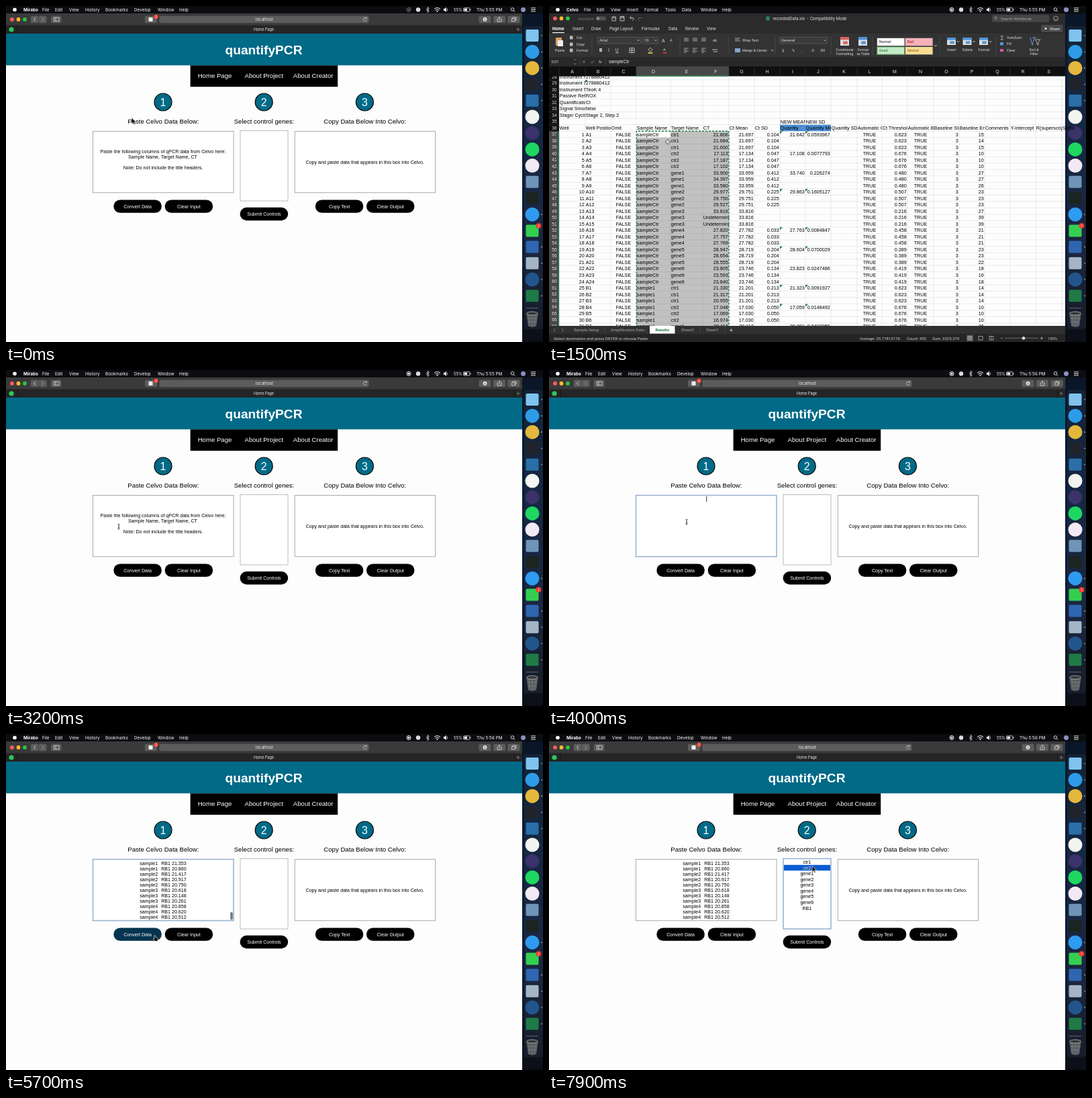
Recreate the animation shown at these times as an HTML page. Size 800 by 500 pixels, loop 8 s.

```html
<!DOCTYPE html>
<html lang="en">
<head>
<meta charset="utf-8">
<title>quantifyPCR demo</title>
<style>
html, body { margin: 0; width: 100%; height: 100%; overflow: hidden; background: #0a101c; }
#stage { display: block; width: 800px; height: 500px; }
text { font-family: "Liberation Sans", Arial, sans-serif; white-space: pre; }
.menu { font-family: Inter, sans-serif; }
.ui { font-family: Roboto, sans-serif; }
#cursor { animation: move 8s infinite; }
@keyframes move {
  0%, 16% { transform: translate(187px, 168px); }
  25%, 41% { transform: translate(168px, 233px); }
  46.2%, 57% { transform: translate(205px, 226px); }
  68%, 77% { transform: translate(222px, 303px); }
  91%, 100% { transform: translate(392px, 198px); }
}
#ants { animation: march .6s linear infinite; }
@keyframes march { to { stroke-dashoffset: -5; } }
#gallery { animation: wake 8s infinite; }
@keyframes wake { 0%, 7.5% { opacity: .55; } 10%, 100% { opacity: 1; } }
#leave { animation: fadeA 8s infinite; }
@keyframes fadeA { 0%, 2.4% { opacity: 0; } 2.5%, 6.2% { opacity: .95; } 7.5% { opacity: .38; } 9%, 100% { opacity: 0; } }
#back { animation: fadeB 8s infinite; }
@keyframes fadeB { 0%, 31.2% { opacity: 0; } 31.3%, 36.2% { opacity: .95; } 39%, 100% { opacity: 0; } }
#convert { animation: hover 8s infinite; }
@keyframes hover { 0%, 67% { fill: #000; } 70%, 76% { fill: #04344f; } 79%, 100% { fill: #000; } }
</style>
</head>
<body>
<svg id="stage" viewBox="0 0 800 500"></svg>
<script>
const LOOP = 8000;
const TEAL = '#006a87';
const css = [];

// y is the optical middle of the line
const T = (s, x, y, size, fill = '#000', at = 'start', cls = '', bold = 400) =>
  `<text x="${x}" y="${(y + size * .36).toFixed(2)}" font-size="${size}" fill="${fill}" text-anchor="${at}" class="${cls}" font-weight="${bold}">${s}</text>`;
const R = (x, y, w, h, fill, more = '') =>
  `<rect x="${x}" y="${y}" width="${w}" height="${h}" fill="${fill}" ${more}/>`;
const C = (x, y, r, fill, more = '') => `<circle cx="${x}" cy="${y}" r="${r}" fill="${fill}" ${more}/>`;
const P = (d, stroke = '#ddd', w = .8, fill = 'none') =>
  `<path d="${d}" stroke="${stroke}" stroke-width="${w}" fill="${fill}"/>`;
const mid = (s, x, y, size, fill, cls, bold) => T(s, x, y, size, fill, 'middle', cls, bold);
const ui = (s, x, y, size = 5.2, fill = '#ddd', at, bold) => T(s, x, y, size, fill, at, 'ui', bold);
const each = (list, fn) => list.map(fn).join('');

// shows the body only during the given [from, to] spans in ms
function during(body, ...spans) {
  const name = 'show' + css.length;
  const steps = each(spans, ([a, b]) =>
    `${a / LOOP * 100}%{opacity:1}` + (b < LOOP ? `${b / LOOP * 100}%{opacity:0}` : ''));
  css.push(`@keyframes ${name}{0%{opacity:0}${steps}}`);
  return `<g style="animation:${name} 8s step-end infinite">${body}</g>`;
}

const lights = y => each(['#ff5f57', '#febc2e', '#28c840'], (c, i) => C(9 + i * 9.5, y, 2.9, c));

function menuItems(app, pairs) {
  return T(app, 26, 5.5, 6.4, '#fff', 'start', 'menu', 700) +
    each(pairs, ([s, x]) => T(s, x, 5.5, 6.4, '#fff', 'start', 'menu'));
}

function statusIcons() {
  const clock = s => T(s, 701, 5.5, 6.4, '#fff', 'start', 'menu');
  return C(13, 5.5, 2.8, '#fff') +
    during(C(600, 5.5, 3, 'none', 'stroke="#777"') + C(600, 5.5, 1.2, '#777'), [0, 500]) +
    during(C(600, 5.5, 3, 'none', 'stroke="#fff"') + C(600, 5.5, 1.6, '#fff'), [500, LOOP]) +
    C(614, 5.5, 3.2, '#ddd') +
    P('M626 3.5L630.5 7.5L628.3 9.5V1.5L630.5 3.5L626 7.5', '#fff', .7) +
    P('M638 4.5Q642.5 .8 647 4.5M639.6 6.3Q642.5 4 645.4 6.3', '#fff', 1) + C(642.5, 8, 1, '#fff') +
    P('M652 4.2h1.5l2.2-2v6.6l-2.2-2h-1.5z', '#fff', .3, '#fff') + P('M657 3.6q1.4 2 0 4', '#fff', .7) +
    T('55%', 667, 5.5, 5.9, '#fff', 'start', 'menu') +
    R(681.5, 2.8, 9.5, 5.4, 'none', 'rx="1" stroke="#fff" stroke-width=".7"') + R(682.5, 3.8, 4.5, 3.4, '#fff') + R(691.4, 4.5, 1, 2, '#fff') +
    during(clock('Thu 5:55 PM'), [0, 3700]) + during(clock('Thu 5:56 PM'), [3700, LOOP]) +
    C(754.5, 5, 2.3, 'none', 'stroke="#fff" stroke-width=".8"') + P('M756.2 6.8l2 2', '#fff') +
    C(770.5, 5.5, 3.5, '#8d8fc4') + P('M782 3h7M782 5.5h7M782 8h7', '#fff', .9);
}

function dock() {
  // colour, round?, running?
  const apps = [['#7fc4ee', 0, 1], ['#2d9be8', 1, 1], ['#e3b83c', 1, 1], ['#20242a', 0, 1], ['#2a6fa8', 0, 1], ['#f4f4f0', 1], ['#3a3268', 1],
    ['#1ed760', 1], ['#f3e9f3', 1], ['#6f94b8', 0], ['#1c2422', 0], ['#2f9bf0', 1, 1], ['#35cf50', 0], ['#2f66b0', 0, 1],
    ['#a4b6c6', 0, 1], ['#22558c', 1, 1], ['#1f7a46', 0, 1]];
  return R(769, 0, 31, 500, 'url(#sky)') + R(772, 30, 28, 451, '#8da0c0', 'opacity=".08" rx="3"') +
    each(apps, ([c, round, on], i) => {
      const y = 44 + i * 24.2;
      return (round ? C(784, y, 10.5, c) : R(774.5, y - 9, 19, 18, c, 'rx="2"')) + (on ? C(798, y, .8, '#cdd') : '');
    }) +
    C(793.5, 327, 4, '#f4342e') + mid('1', 793.5, 327, 5.5, '#fff') +
    P('M775 449.5h18', '#8590a5', .6) +
    P('M776 458L778.5 476Q784 478.5 789.5 476L792 458z', '#888', .6, '#55595c') +
    P('M779 460l2 15M784 460v16M789 460l-2 15M777 465h14M778 470h12', '#92979a', .5) +
    `<ellipse cx="784" cy="457.5" rx="8.5" ry="2.6" fill="#34383a" stroke="#aaa" stroke-width=".9"/>`;
}

function browserBar() {
  const btn = (x, w) => R(x, 14.8, w, 10.4, '#5c5c5c', 'rx="1.8"');
  return R(0, 11, 769, 18, '#3a3a3b') + R(0, 28.6, 769, 12.4, '#252526') + lights(20) +
    btn(37, 11.5) + btn(49, 11.5) + btn(67, 15.5) + btn(704.5, 18) + btn(726, 18) + btn(747.5, 18) +
    P('M44 17.3L41.6 20L44 22.7', '#eee') + P('M53.6 17.3L56 20L53.6 22.7', '#aaa') +
    P('M71.5 17.3h7.5v5.4h-7.5zM74 17.3v5.4', '#eee', .7) +
    btn(207, 18) + R(212.5, 17, 6, 6, '#eee') + C(223.5, 16, 3.3, '#f23d36') + mid('2', 223.5, 16, 4.5, '#fff') +
    R(228.5, 14.8, 312, 10.4, '#5c5c5c', 'rx="1.8"') + mid('localhost', 385, 20, 6.1, '#f0f0f0', 'menu') +
    P('M536.8 18.2A2.5 2.5 0 1 0 537.3 20.6M537.2 16.6v2h-2', '#ddd', .7) +
    C(713.5, 20, 2.9, '#eee') + P('M713.5 18v3.6M712 20.2l1.5 1.6l1.5-1.6', '#444', .6) +
    P('M733 19h-1v4.2h6V19h-1M735 21.5v-5M733.5 18l1.5-1.6l1.5 1.6', '#eee', .7) +
    P('M753.5 18.8h5v4h-5zM755 18.6v-1.6h5v4h-1.4', '#eee', .7) +
    C(8, 35, 3.6, '#2fc65a') + P('M17.2 29v12M757.5 29v12', '#111', .7) + mid('Home Page', 384, 35, 5.5, '#eee', 'menu') +
    P('M760.5 35h5M763 32.5v5', '#999', .7);
}

function page() {
  const box = (x, y, w, h, stroke = '#aaa', lw = 1) => R(x, y, w, h, '#fff', `stroke="${stroke}" stroke-width="${lw}"`);
  const focus = (x, y, w, h) => R(x, y, w, h, 'none', 'stroke="#b9cfe8" stroke-width="1.9"') + R(x, y, w, h, 'none', 'stroke="#8da3bf" stroke-width=".6"');
  const pill = (s, x, y, id = '') => R(x, y, 71.6, 19.4, '#000', `rx="9.7" ${id}`) + mid(s, x + 35.8, y + 9.8, 7.1, '#fff');
  const steps = ['Paste Celvo Data Below:', 'Select control genes:', 'Copy Data Below Into Celvo:'];
  const pasted = [[1, 21.353], [1, 20.86], [2, 21.417], [2, 20.917], [2, 20.75], [3, 20.618], [3, 20.148], [3, 20.261], [4, 20.858], [4, 20.62], [4, 20.512]];
  const genes = ['ctr1', 'ctr2', 'gene1', 'gene2', 'gene3', 'gene4', 'gene5', 'gene6', 'RB1'];
  const rows = each(pasted, ([n, v], i) => {
    const y = 192 + i * 8.06;
    return T('sample' + n, 199.3, y, 7.1) + T('RB1 ' + v.toFixed(3), 231.2, y, 7.1);
  });
  return R(0, 41, 769, 459, '#fdfdfd') + R(0, 41, 769, 47.3, TEAL) +
    mid('quantifyPCR', 384, 65, 19.2, '#fff', '', 700) +
    R(274.6, 88.3, 219.6, 31.9, '#000') +
    each([['Home Page', 311], ['About Project', 384.3], ['About Creator', 457.7]], ([s, x]) => mid(s, x, 104, 9.6, '#fff')) +
    each(steps, (s, i) => C(234 + 150.2 * i, 143, 13, TEAL, 'stroke="#000" stroke-width="1.2"') +
      mid(i + 1, 234 + 150.2 * i, 143, 16, '#fff') + mid(s, 234.3 + 150.2 * i, 171.2, 9.6)) +
    box(129.5, 186.5, 209.5, 91.2) + box(349, 185.5, 71, 104.5, '#bbb') + box(430.3, 186.5, 209.2, 91.2) +
    during(mid('Paste the following columns of qPCR data from Celvo here:', 234, 216, 7.1) +
      mid('Sample Name, Target Name, CT', 233.5, 224.2, 7.1) +
      mid('Note: Do not include the title headers.', 234, 240.4, 7.1), [0, 3600]) +
    mid('Copy and paste data that appears in this box into Celvo.', 534.7, 232.3, 7.1) +
    during(focus(129.5, 186.5, 209.5, 91.2), [3600, 6000]) +
    during(R(234.4, 188, .8, 8, '#000'), [3600, 4150]) +
    during(rows, [4500, LOOP]) +
    during(R(334.2, 265, 3.6, 11.5, '#777', 'rx="1.8"'), [4500, 6000]) +
    during(R(349.5, 194.8, 70, 8.5, '#0a5cd2') + focus(349, 185.5, 71, 104.5), [7500, LOOP]) +
    during(each(genes, (s, i) => mid(s, 384.3, 190.5 + i * 8.57, 7.1)), [6100, LOOP]) +
    during(mid('ctr2', 384.3, 199.07, 7.1, '#fff'), [7500, LOOP]) +
    pill('Convert Data', 160.3, 288.4, 'id="convert"') + pill('Clear Input', 236.6, 288.4) + pill('Submit Controls', 348.6, 299.8) +
    pill('Copy Text', 460.8, 288.4) + pill('Clear Output', 536.9, 288.4);
}

const EDGES = [15, 54, 92, 130, 181, 229, 268, 306, 344, 382, 420, 459, 496, 534, 573, 611, 649, 687, 725, 764, 802];
const rowY = r => 191 + 9.52 * (r - 37);

function ribbon() {
  const lines = (x, y, ws) => P(each(ws, (w, i) => `M${x} ${y + i * 2}h${w}`), '#ccc', .7);
  const field = (x, w) => R(x, 46.5, w, 9.5, '#3a3a3a', 'rx="1" stroke="#666" stroke-width=".6"') + P(`M${x + w - 6} 50l2 2l2-2`, '#ccc', .7);
  const grid = (x, y, w, h, c) => R(x, y, w, h, '#ddd') + R(x, y, w, h / 3, c) + R(x + w / 3, y + h / 2, w / 2, h / 3, c);
  const tabs = [['Insert', 35], ['Draw', 63], ['Page Layout', 90], ['Formulas', 138], ['Data', 178], ['Review', 203], ['View', 235]];
  const styles = [['Normal', 489, 48, '#fff', '#111'], ['Bad', 531, 48, '#f7b2b8', '#a01020'], ['Good', 489, 61, '#c3ebc6', '#14691c'], ['Neutral', 531, 61, '#f8dc93', '#8d5c00']];
  return R(0, 11, 769, 30, '#2b2b2c') + R(0, 41, 769, 35, '#333334') + lights(18.5) +
    ui('AutoSave', 43, 18.5, 5.6, '#777') + R(70, 15.5, 15, 6, '#505050', 'rx="3"') + C(73, 18.5, 2.4, '#888') +
    P('M94 16h5.5v6H94zM96 16v2h3', '#ddd') + P('M106 15.5h6v6.5h-6zM107.5 15.5v2.5h3v-2.5', '#ddd') +
    P('M121 17.5h4.5q2 2.2-1.5 4.4M122.5 15.5l-2 2l2 2', '#ddd') + P('M138 17.5h-4.5q-2 2.2 1.5 4.4', '#777') +
    R(323.5, 15.5, 5, 6, '#2d8a54') + mid('recordedData.xls&#160; - &#160;Compatibility Mode', 388.5, 18.6, 6.3, '#ddd', 'ui') +
    R(660, 13.3, 85, 10.6, '#454546', 'rx="2"') + C(665.5, 18, 1.8, 'none', 'stroke="#bbb" stroke-width=".6"') + ui('Search Workbook', 673, 18.6, 5.9, '#aaa') +
    C(755, 18.5, 3.4, 'none', 'stroke="#ccc" stroke-width=".7"') + P('M753.4 19.4q1.6 1.6 3.2 0', '#ccc', .6) +
    ui('Home', 5, 33.5, 6.5, '#fff', 'start', 700) + R(5, 39, 18, 1.2, '#fff') +
    each(tabs, ([s, x]) => ui(s, x, 33.5, 6.4)) +
    R(733, 28, 32.5, 11, '#48484a', 'rx="1.5"') + C(740, 33.5, 1.5, '#eee') + ui('Share', 746, 33.6, 5.8, '#fff') +
    R(10, 47, 9, 12, '#d6a55a', 'rx="1"') + R(13, 51, 8, 9, '#eee') + ui('Paste', 9, 66, 5.6) +
    each([['Cut', 47], ['Copy', 57], ['Format', 66]], ([s, y]) => R(31, y - 2.5, 4.5, 5, '#bcbcbc') + ui(s, 41, y, 5.4)) +
    P(each([64, 195, 268, 337, 420, 482, 582, 666], x => `M${x} 45v27`), '#505050', .7) +
    field(72, 65) + ui('Arial', 75, 51.3, 6) + field(139, 24) + ui('10', 142, 51.3, 6) +
    ui('A', 168, 51, 7) + ui('A', 180, 51, 5.6) +
    ui('B', 75, 66, 6.6, '#fff', 'start', 700) + `<g font-style="italic">${ui('I', 88, 66, 6.6)}</g>` + ui('U', 99, 66, 6.6) + P('M99 69.5h5M120 62.5h7v7h-7zM123.5 62.5v7M120 66h7') +
    P('M148 65l3-3l3 3l-3 3z', '#ddd') + R(147.5, 69, 7, 1.6, '#f2dc3c') + ui('A', 170, 65.3, 6) + R(169.5, 69, 6, 1.6, '#e33') +
    each([201, 214, 227], x => lines(x, 48, [7, 7, 7]) + lines(x, 63, [7, 4, 7, 4])) + ui('ab', 244, 50.5, 5.6) + P('M243 65h8M245 68h6') +
    lines(277, 48, [8, 6, 8]) + ui('Wrap Text', 288, 50.8, 5.4) + R(277, 63, 8, 6, '#7fa9cf') + ui('Merge &amp; Center', 288, 66, 5.4) + P('M331 65l1.7 2l1.7-2') +
    field(343, 72) + ui('General', 346, 51.3, 6) + each([['$', 347], ['%', 362], [',', 376], ['.0', 390], ['.00', 403]], ([s, x]) => ui(s, x, 66, 6)) +
    grid(434, 46, 13, 13, '#d5665f') + mid('Conditional', 440.5, 65, 5.2, '#ddd', 'ui') + mid('Formatting', 440.5, 71, 5.2, '#ddd', 'ui') +
    grid(461, 46, 13, 13, '#4f94d8') + mid('Format', 468, 65, 5.2, '#ddd', 'ui') + mid('as Table', 468, 71, 5.2, '#ddd', 'ui') +
    `<g id="gallery">` + R(488, 47, 84, 26, '#555') +
    each(styles, ([s, x, y, bg, fg]) => R(x, y, 40.5, 11, bg, s === 'Good' ? 'stroke="#61a868" stroke-width=".9"' : '') + ui(s, x + 3, y + 5.5, 5.2, fg)) + `</g>` +
    P('M574 58l2 2l2-2') +
    each([['Insert', 600], ['Delete', 623.5], ['Format', 648]], ([s, x]) => grid(x - 7, 47, 13, 11, '#4f94d8') + mid(s, x, 65, 5.3, '#ddd', 'ui') + P(`M${x + 8} 52l1.6 2l1.6-2`)) +
    P('M677 45h-4l2.5 2.5L673 50h4', '#ddd', .7) + ui('AutoSum', 682, 47.3, 5.4) + R(672, 54, 5, 4.5, '#4f94d8') + ui('Fill', 682, 56.5, 5.4) + R(672, 64, 5, 4, '#d5a') + ui('Clear', 682, 66, 5.4) +
    P('M717 47l3 11l3-11M726 47h-6', '#7db2e8') + P('M724 50h8l-3 4v4l-2-1v-3z', '#ddd', .7) + mid('Sort &amp;', 722.5, 65, 5.2, '#ddd', 'ui') + mid('Filter', 722.5, 71, 5.2, '#ddd', 'ui') +
    R(0, 76, 769, 14, '#292929') + ui('D37', 4, 83, 5.8) + P('M37 81l1.8-2l1.8 2M37 85l1.8 2l1.8-2M50 81l4 4M54 81l-4 4M62 83l2 2l3-4', '#999', .7) +
    `<g font-style="italic">${ui('fx', 74, 83, 6)}</g>` + P('M46 78v10M84 78v10', '#555', .6) + T('sampleCtr', 89, 83, 6.7, '#eee');
}

function sheet() {
  const ct = [21.806, 21.684, 21.6, 17.113, 17.1874, 17.1016, 33.9, 34.397, 33.58, 29.977, 29.75, 29.527, 33.816, null, null, 27.82, 27.757, 27.769,
    28.947, 28.654, 28.555, 23.805, 23.593, 23.84, 21.33, 21.317, 20.955, 17.048, 17.069, 16.974, 30.112];
  const target = 'ctr1 ctr2 gene1 gene2 gene3 gene4 gene5 gene6'.split(' ');
  const limit = ['0.623', '0.676', '0.480', '0.507', '0.216', '0.458', '0.389', '0.419'];
  const end = [15, 14, 15, 10, 10, 10, 27, 27, 26, 23, 23, 23, 27, 39, 39, 21, 21, 21, 23, 23, 22, 18, 16, 18, 14, 14, 14, 10, 10, 10, 26];
  const fresh = ['21.642 0.0593967', '17.108 0.0077793', '33.740 0.226274', '29.863 0.1605127', '', '27.763 0.0084847', '28.604 0.0700029', '23.823 0.0247486', '21.323 0.0091927', '17.059 0.0148492', '29.081 0.0402059'];
  const flagged = [0, 3, 5, 6, 8, 9];
  const heads = ['Well', 'Well Position', 'Omit', 'Sample Name', 'Target Name', 'CT', 'Ct Mean', 'Ct SD', 'Quantity', 'Quantity Mean', 'Quantity SD', 'Automatic Ct', 'Ct Threshold', 'Automatic Ba', 'Baseline Start', 'Baseline End', 'Comments', 'Y-Intercept', 'R(superscript)', 'Slope'];
  const info = [['Instrument Name', '278880412'], ['Instrument Serial', '278880412'], ['Instrument Type', 'TeoK 4'], ['Passive Reference', 'ROX'], ['Quantification', 'Ct'], ['Signal Smoothing', 'false'], ['Stage/ Cycling', '']];
  const cell = (s, col, row, at = 'start') => {
    const x = EDGES[col], w = EDGES[col + 1] - x;
    const tx = at === 'start' ? .8 : at === 'end' ? w - 1.2 : w / 2;
    return `<svg x="${x}" y="${rowY(row) - 5}" width="${w}" height="10">${T(s, tx, 5, 7.2, '#000', at)}</svg>`;
  };
  const flag = (x, row) => P(`M${x} ${rowY(row) - 4.5}h4l-4 4z`, 'none', 0, '#1e7a3c');
  const top = rowY(36.5);
  let out = R(15, 104, 754, 372, '#fdfdfd') + R(130, top, 138, 300, '#c1c1c1') + R(130, top, 51, 9.5, '#fff') + R(344, rowY(35.5), 76, 9.5, '#4b8fd6');
  out += P(each(EDGES, x => `M${x} 104V476`) + each([...Array(40).keys()], i => `M15 ${(rowY(28.5) + i * 9.52).toFixed(2)}H769`), 'rgba(110,110,110,.22)', .6);
  out += each(info, ([a, b], i) => cell(a, 0, 28 + i) + cell(b, 1, 28 + i)) + T('Stage 2, Step 2', 54.8, rowY(34), 7.2) + flag(54, 29);
  out += cell('NEW MEAN', 8, 35) + cell('NEW SD', 9, 35) + each(heads, (s, i) => cell(s, i, 36));
  ct.forEach((v, i) => {
    const r = 37 + i, k = Math.floor(i / 3), set = ct.slice(k * 3, k * 3 + 3).filter(n => n);
    const mean = set.reduce((a, b) => a + b) / set.length;
    const sd = Math.sqrt(set.reduce((a, b) => a + (b - mean) ** 2, 0) / (set.length - 1));
    out += cell(i + 1, 0, r, 'end') + cell('AB'[i < 24 ? 0 : 1] + (i % 24 + 1), 1, r) + cell('FALSE', 2, r, 'middle') +
      cell(i < 24 ? 'sampleCtr' : 'sample1', 3, r) + cell(target[k % 8], 4, r) +
      (v ? cell(v.toFixed(3), 5, r, 'end') : cell('Undetermined', 5, r)) + cell(mean.toFixed(3), 6, r, 'end') +
      (set.length > 1 ? cell(sd.toFixed(3), 7, r, 'end') : '') +
      cell('TRUE', 11, r, 'middle') + cell(limit[k % 8], 12, r, 'end') + cell('TRUE', 13, r, 'middle') + cell(3, 14, r, 'end') + cell(end[i], 15, r, 'end');
    if (i % 3 === 0 && fresh[k]) {
      const [m, s] = fresh[k].split(' ');
      out += cell(m, 8, r, 'end') + cell(s, 9, r, 'end') + (flagged.includes(k) ? flag(344, r) + flag(382, r) : '');
    }
  });
  out += `<path id="ants" d="M130.3 476V${top}H268V476" fill="none" stroke="#1c8045" stroke-width="1.3" stroke-dasharray="3 2"/>`;
  out += R(0, 104, 15, 372, '#0f0f10') + R(0, top, 15, 290, '#484848') + R(14.2, top, 1, 290, '#2b9457');
  for (let r = 28; r < 68; r++) out += mid(r, 8, rowY(r), 6.6, '#e4e4e4') + P(`M0 ${rowY(r + .5)}h15`, '#555', .4);
  out += R(0, 90, 769, 14.5, '#0f0f10') + R(130, 90, 138, 14.5, '#484848') + R(130, 103.4, 138, 1.1, '#2b9457') +
    each([...'ABCDEFGHIJKLMNOPQRS'], (c, i) => mid(c, (EDGES[i] + EDGES[i + 1]) / 2, 97.5, 7, '#e4e4e4') + P(`M${EDGES[i]} 91v12`, '#444', .5));
  return out;
}

function sheetTabs() {
  const tabs = [['Sample Setup', 37], ['Amplification Data', 92], ['Sheet2', 197], ['Sheet1', 234]];
  return R(0, 476, 769, 12, '#303031') + R(0, 488, 769, 12, '#252526') +
    P('M9.5 480l-2.5 2.5l2.5 2.5M19 480l2.5 2.5l-2.5 2.5', '#999') + R(150, 476, 37.5, 11.5, '#fff') + mid('Results', 168.8, 482, 6.1, '#1c7a43', 'ui', 700) +
    each(tabs, ([s, x]) => ui(s, x, 482, 6.1, '#aaa')) + P('M269 482.5h5M271.5 480v5', '#ccc') +
    P('M83 477v10M145 477v10M225 477v10M262 477v10', '#555', .5) +
    each([['Select destination and press ENTER or choose Paste', 7], ['Average: 25.77813178', 463], ['Count: 405', 533], ['Sum: 3325.379', 571], ['150%', 743]], ([s, x]) => ui(s, x, 494.4, 6, '#d0d0d0')) +
    R(622, 489.5, 10, 9.5, '#505050') + P('M624 491.5h6v5.5h-6zM624 494h6M627 491.5v5.5M640 491.5h6v5.5h-6zM656 491.5h6v5.5h-6zM659 491.5v5.5', '#ddd', .6) +
    P('M673 494.3h3M732 494.3h4M734 492.3v4', '#ccc', .7) + P('M679 494.3h50', '#777', .9) + C(707, 494.3, 2.4, '#ddd');
}

function switcher(id, span, picked, label, first) {
  const rest = ['#4794d4', '#9cc9ea', '#3a3d40', '#c4ccd2', '#54aaf0', '#3f74bc', '#e6bd4a'];
  const round = ['#3aa5ec', '#2d5f94', '#54aaf0', '#e6bd4a'];
  return `<g id="${id}">` + during(R(78, 212, 642, 86, '#777', 'rx="9" opacity=".14"'), span) +
    each([...first, ...rest], (c, i) => {
      const x = 113 + i * 63.5;
      return round.includes(c) ? C(x, 249, 23.5, c) : R(x - 24, 226, 49, 46, c, 'rx="5"');
    }) + mid(label, 113 + picked * 63.5 + 5, 289, 7.5, '#888', 'menu') + `</g>`;
}

function pointer() {
  const arrow = P('M0-2v9.5l2.2-2l1.5 3.3l1.5-.7l-1.5-3.1h3z', '#fff', .6, '#111');
  const hand = dark => P('M-1.3-3q1.1-1.2 1.6 0l.5 2.6l2.8.7q1.1.5.9 2l-.8 2.9H-.4L-2.8 2q.3-1.3 1.6-.3z', dark ? '#fff' : '#222', .6, dark ? '#111' : '#fff');
  const cross = P('M-1-3.4h2v2.4h2.4v2H1v2.4h-2V1h-2.4v-2H-1z', '#222', .6, '#fff');
  const beam = P('M-1.6-3.5Q0-3.5 0-2.4V2.6Q0 3.7-1.6 3.7M1.6-3.5Q0-3.5 0-2.4M0 2.6Q0 3.7 1.6 3.7M-1 1h2', '#111', .8);
  return `<g id="cursor">` + during(arrow, [0, 500], [5000, 5350], [6300, LOOP]) + during(hand(false), [500, 1300]) + during(hand(true), [5350, 6300]) +
    during(cross, [1300, 2900]) + during(beam, [2900, 5000]) + `</g>`;
}

const MENU_TAIL = [['Window', 226], ['Help', 258]];
const browserMenu = menuItems('Mirabo', [['File', 54], ['Edit', 73], ['View', 94], ['History', 118], ['Bookmarks', 148], ['Develop', 191], ...MENU_TAIL]);
const gridMenu = menuItems('Celvo', [['File', 52], ['Edit', 71], ['View', 92], ['Insert', 116], ['Format', 142], ['Tools', 173], ['Data', 198], ...MENU_TAIL]);

document.getElementById('stage').innerHTML =
  `<defs><linearGradient id="sky" x2="0" y2="1"><stop stop-color="#0a1626"/><stop offset=".35" stop-color="#0b1c38"/><stop offset=".7" stop-color="#101c36"/><stop offset="1" stop-color="#0c0f18"/></linearGradient></defs>` +
  dock() + R(0, 0, 800, 11, '#0b0d10') + statusIcons() +
  during(browserMenu + browserBar() + page(), [0, 500], [2900, LOOP]) +
  during(gridMenu + sheet() + ribbon() + sheetTabs(), [500, 2900]) +
  switcher('leave', [200, 600], 2, 'Brandovia Celvo', ['#3aa5ec', '#2d5f94', '#3d9060']) +
  switcher('back', [2500, 2900], 1, 'Mirabo', ['#3d9060', '#3aa5ec', '#2d5f94']) +
  pointer();

const sheetRules = document.createElement('style');
sheetRules.textContent = css.join('');
document.head.append(sheetRules);
</script>
</body>
</html>
```
